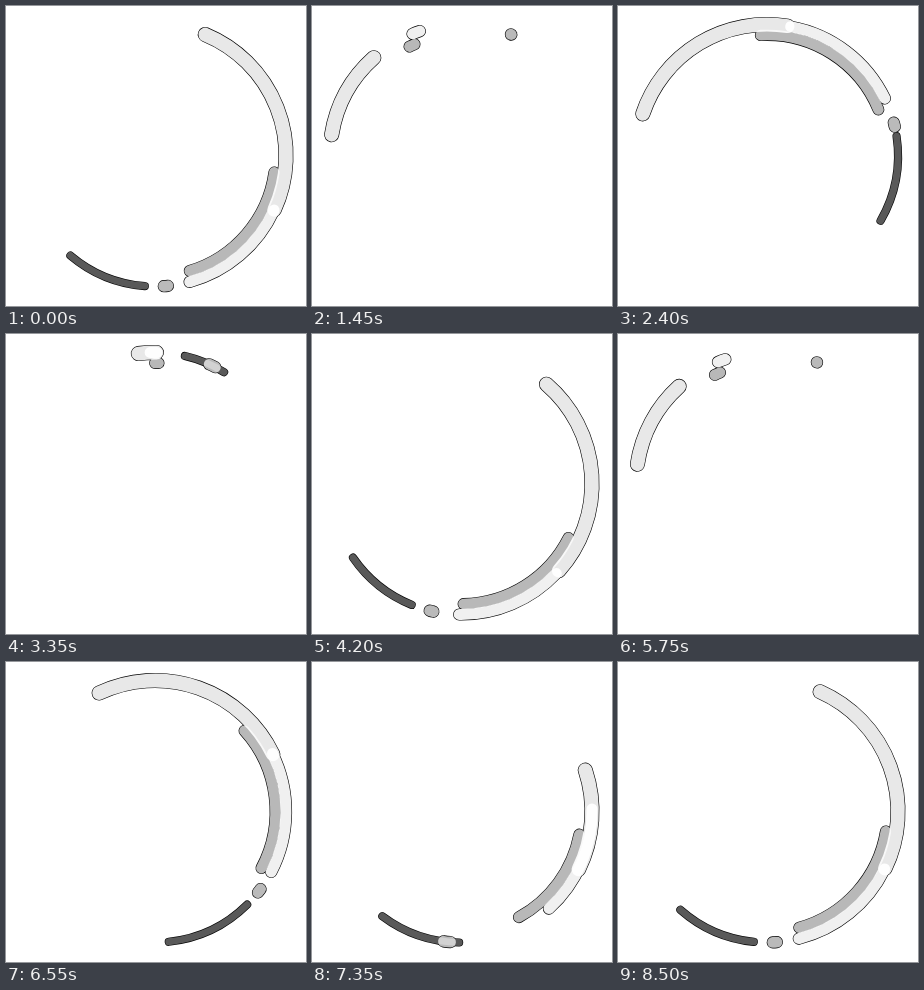
Write an HTML page that moves like this. It is 300 px wide and 300 px high and loops after 8.55 s.

```html
<!DOCTYPE html>
<html lang="en">
<head>
<meta charset="utf-8">
<title>Ring loader</title>
<style>
  html, body { margin: 0; width: 100%; height: 100%; overflow: hidden; background: #fff; }
  svg { display: block; width: 100vw; height: 100vh; }
  path { fill: none; stroke-linecap: round; }
</style>
</head>
<body>
<svg id="stage" viewBox="0 0 300 300"></svg>
<script>
const LOOP = 8550, PERIOD = 2126, TURN = 720;
const CENTER = { x: 149, y: 149.5 };

// Moments of one cycle, in ms, at which the arc ends below are given.
const KEYS = [0, 638, 952.5, 1240, 1473];

// Head and tail are angles in degrees, counterclockwise from the top.
const ARCS = [
  { radius: 131, width: 13.8, alpha: 0.91,
    head: [337.1, 534.7, 648.1, 727, 800.6], tail: [245.2, 477.5, 603.4, 719.1, 761.5] },
  { radius: 131, width: 11, alpha: 0.94,
    head: [245, 477.5, 630.7, 722, 741.6], tail: [195, 427.3, 581.7, 719, 738.2] },
  { radius: 120.5, width: 10.6, alpha: 0.72,
    head: [261.6, 481.7, 618.6, 719.8, 745.2], tail: [196.4, 417.3, 568.2, 718.1, 742.5] },
  { radius: 131, width: 7, alpha: 0.35, hideShort: true,
    head: [175.2, 404.8, 538.7, 706.8, 697.5], tail: [139.5, 369.6, 502.6, 688.1, 697.5] },
  { radius: 131, width: 11, alpha: 0.73,
    head: [185.3, 403.6, 534.9, 695.5, 697.6], tail: [183.5, 401.8, 531.9, 692.6, 697.4] }
];

// Any index of a track, continued over neighbouring cycles.
function knot(list, i, step) {
  const n = list.length, cycle = Math.floor(i / n);
  return list[i - cycle * n] + cycle * step;
}

// Monotone cubic interpolation: the ends never overshoot their keys.
function sample(track, time) {
  const at = i => knot(KEYS, i, PERIOD);
  const value = i => knot(track, i, TURN);
  const rate = i => (value(i + 1) - value(i)) / (at(i + 1) - at(i));
  const slope = i => {
    const before = rate(i - 1), after = rate(i);
    return before * after <= 0 ? 0 : 2 * before * after / (before + after);
  };
  let i = KEYS.length - 1;
  while (KEYS[i] > time) i--;
  const span = at(i + 1) - at(i), s = (time - at(i)) / span;
  const s2 = s * s, s3 = s2 * s;
  return value(i) * (2 * s3 - 3 * s2 + 1) + value(i + 1) * (3 * s2 - 2 * s3)
    + span * (slope(i) * (s3 - 2 * s2 + s) + slope(i + 1) * (s3 - s2));
}

function point(radius, degrees) {
  const a = degrees * Math.PI / 180;
  return (CENTER.x - radius * Math.sin(a)).toFixed(2) + ' ' + (CENTER.y - radius * Math.cos(a)).toFixed(2);
}

function addPath(color, width, opacity) {
  const path = document.createElementNS('http://www.w3.org/2000/svg', 'path');
  path.setAttribute('stroke', color);
  path.setAttribute('stroke-width', width);
  path.setAttribute('stroke-opacity', opacity);
  document.getElementById('stage').append(path);
  return path;
}

// All dark shapes lie below all translucent white ones, so overlaps get lighter.
const edges = ARCS.map(arc => addPath('#000', arc.width + 1.2, 1));
const fills = ARCS.map(arc => addPath('#fff', arc.width, arc.alpha));

function draw(t) {
  const clock = t + 26 * Math.sin(2 * Math.PI * t / 8500);
  const time = clock % PERIOD;
  ARCS.forEach((arc, i) => {
    const head = sample(arc.head, time), tail = sample(arc.tail, time);
    const span = Math.max(head - tail, 0.1);
    const hidden = arc.hideShort && span < 0.4;
    const d = hidden ? '' :
      `M${point(arc.radius, tail)}A${arc.radius} ${arc.radius} 0 0 0 ${point(arc.radius, tail + span)}`;
    edges[i].setAttribute('d', d);
    fills[i].setAttribute('d', d);
  });
}

const start = performance.now();
function tick() {
  draw((performance.now() - start) % LOOP);
  requestAnimationFrame(tick);
}
draw(0);
requestAnimationFrame(tick);
</script>
</body>
</html>
```
